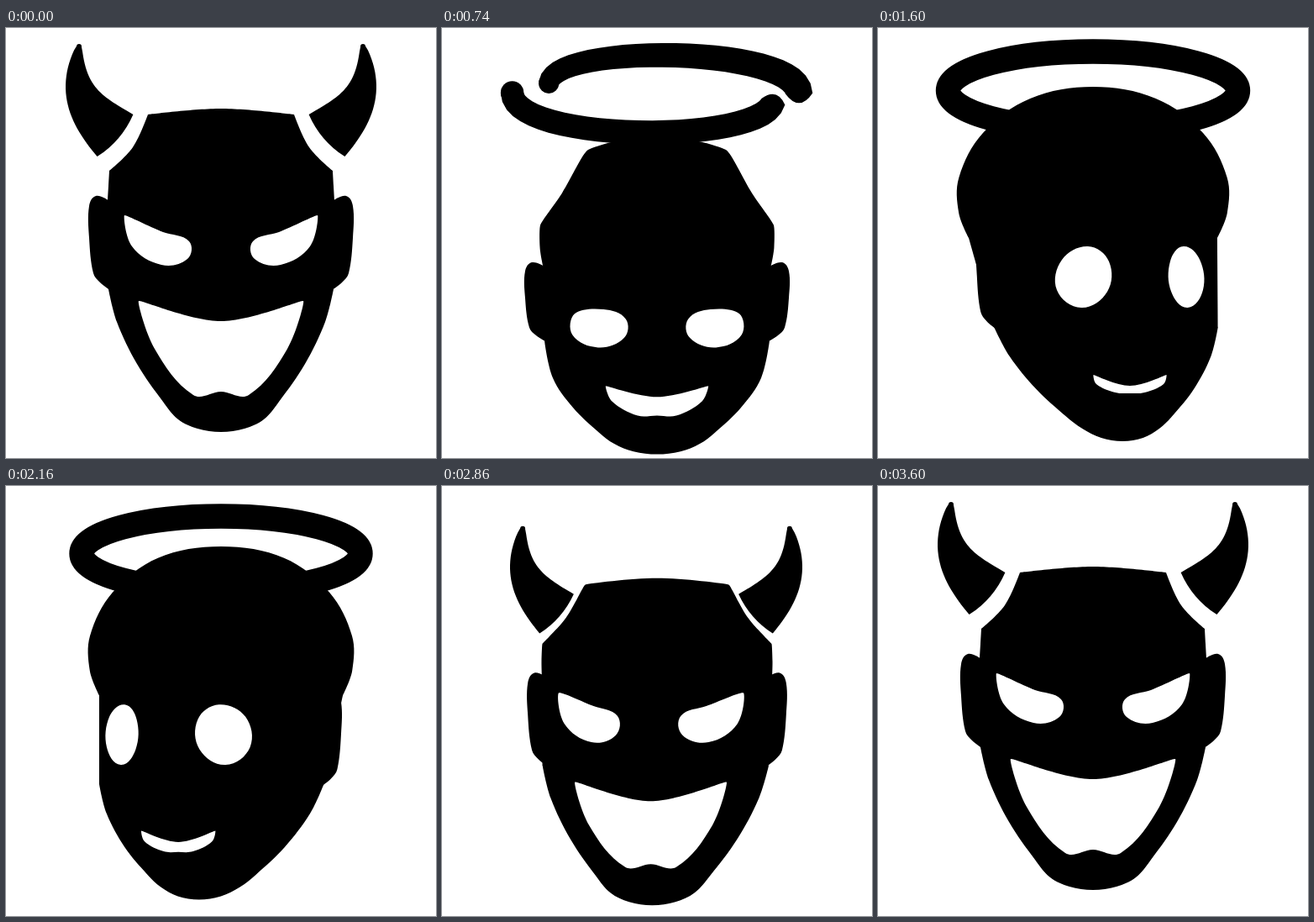
An HTML page with a canvas for the animation above (3.62 s loop, 512x512 px).

```html
<!DOCTYPE html>
<html lang="en">
<head>
<meta charset="utf-8">
<title>Devil and angel</title>
<style>
html, body { margin: 0; width: 100%; height: 100%; overflow: hidden; background: #fff; }
canvas { display: block; width: 100vw; height: 100vh; }
</style>
</head>
<body>
<canvas width="512" height="512"></canvas>
<script>
const ctx = document.querySelector('canvas').getContext('2d');
const LOOP = 3620, MID = 256, HALO_WIDTH = 29.4;

const pts = s => s.split(' ').map(p => p.split(',').map(Number));
const flip = shape => shape.map(([x, y]) => [2 * MID - x, y]);
const sym = half => [...half, ...flip(half.slice(1, -1).reverse())];
const clamp = v => Math.max(0, Math.min(1, v));

// Blends numbers, arrays and objects of the same structure.
function lerp(a, b, k) {
  if (typeof a === 'number') return a + (b - a) * k;
  if (Array.isArray(a)) return a.map((v, i) => lerp(v, b[i], k));
  return Object.fromEntries(Object.keys(a).map(key => [key, lerp(a[key], b[key], k)]));
}

const ease = {
  both: k => k * k * (3 - 2 * k),
  in: k => k ** 1.5,
  out: k => Math.sin(k * Math.PI / 2),
  flat: k => k
};

// Keys are [time, value, easing towards it].
function track(keys, t) {
  const i = keys.findIndex(k => t < k[0]);
  if (i < 1) return keys[0][1];
  const [t0, a] = keys[i - 1], [t1, b, kind = 'flat'] = keys[i];
  return lerp(a, b, ease[kind]((t - t0) / (t1 - t0)));
}

// Key shapes, devil first and angel second.
const skulls = [
  pts('256,96 343,103 361,142 389,170 390,188 391,205 390,311'),
  pts('256,70 330,84 382,125 404,178 404,220 393,250 390,356')];
const eyes = [
  pts('141,223 187,243 218,254 216,275 185,282 150,260'),
  pts('163,276 194,260 219,278 217,314 186,333 157,312')];
const mouths = [
  pts('256,349 158,325 177,382 223,437 256,433'),
  pts('256,426 206,413 210,424 236,434 256,435')];
const jaw = pts('380,350 356,400 325,445 307,466 284,477 256,481');
const ear = pts('389,206 405,200 413,212 413,250 408,292 400,303 388,312');

// skull and face run from devil (0) to angel (1); turn moves the features, chin the head.
const devil = { skull: 0, face: 0, squash: 0, turn: 0, chin: 0, drop: 0 };
const angel = { ...devil, skull: 1, face: 1 };
const right = { ...angel, turn: 1, chin: 1 };
const left = { ...angel, turn: -1.2, chin: -0.77 };
const low = { ...devil, skull: 0.12, face: 0.12, turn: -0.17, chin: -0.17, drop: 17 };
const headKeys = [
  [400, devil], [560, { ...devil, skull: 0.15, face: 0.68, squash: 1 }, 'both'],
  [1080, angel, 'both'], [1120, angel], [1560, right, 'both'], [1600, right],
  [1880, left, 'both'], [2080, left], [2720, { ...low, drop: 21 }, 'both'],
  [2860, low, 'both'], [3600, devil, 'out'], [LOOP, devil]];

// A horn is a tapered brush along a cubic curve; cap rounds its base.
const horn = { line: pts('87,22 77,73 96,99 130,128'), tip: 6, base: 66, cap: 10 };
const horns = [horn, { ...horn, line: flip(horn.line) }];
const lowHorns = horns.map(h => ({
  line: h.line.map(([x, y]) => [255 + (x - MID) * 0.94, 29.8 + y * 0.956]),
  tip: 6, base: 62, cap: 9
}));
const swoosh = [
  { line: pts('84,88 88,138 175,152 247,145'), tip: 19, base: 27, cap: 8 },
  { line: pts('316,28 352,38 403,61 410,92'), tip: 2, base: 46, cap: 36 }];
const halo = { cy: 74.5, rx: 172.5, ry: 46.5 };
const smallHalo = { cy: 80.5, rx: 166, ry: 44.5 };
const halves = ({ cy, rx, ry }) => [1, -1].map(dir => {
  const y = cy + dir * ry * 4 / 3;
  return {
    line: [[MID - rx, cy], [MID - rx, y], [MID + rx, y], [MID + rx, cy]],
    tip: HALO_WIDTH, base: HALO_WIDTH, cap: 20
  };
});
const RING_START = 860, SHRINK = 2080, RING_END = 2180;
const hornKeys = [
  [400, horns], [560, swoosh, 'in'], [RING_START, halves(halo), 'out'],
  [RING_END, halves(smallHalo)], [2420, swoosh], [2720, lowHorns, 'out'],
  [2860, lowHorns], [3600, horns, 'out'], [LOOP, horns]];

function brush({ line: [a, b, c, d], tip, base, cap }) {
  const inner = [], outer = [], steps = 28;
  let dir;
  for (let i = 0; i <= steps; i++) {
    const t = i / steps, s = 1 - t;
    const [x, y] = [0, 1].map(n =>
      s ** 3 * a[n] + 3 * s * s * t * b[n] + 3 * s * t * t * c[n] + t ** 3 * d[n]);
    dir = [0, 1].map(n =>
      s * s * (b[n] - a[n]) + 2 * s * t * (c[n] - b[n]) + t * t * (d[n] - c[n]));
    const len = Math.hypot(...dir), w = (tip + (base - tip) * t ** 0.8) / 2;
    dir = dir.map(v => v / len);
    inner.push([x + dir[1] * w, y - dir[0] * w]);
    outer.push([x - dir[1] * w, y + dir[0] * w]);
  }
  ctx.fillStyle = '#000';
  ctx.beginPath();
  inner.forEach(p => ctx.lineTo(...p));
  ctx.quadraticCurveTo(d[0] + dir[0] * cap, d[1] + dir[1] * cap, ...outer[steps]);
  outer.reverse().forEach(p => ctx.lineTo(...p));
  ctx.fill();
  ctx.beginPath();
  ctx.arc(...a, tip / 2, 0, 2 * Math.PI);
  ctx.fill();
}

// Closed smooth curve; soft(i) is the roundness at point i, 0 being a corner.
function blob(shape, color, soft) {
  const n = shape.length, at = i => shape[(i + n) % n];
  const handle = (i, len) => {
    const [ax, ay] = at(i - 1), [bx, by] = at(i + 1);
    const k = 0.35 * len * soft(i % n) / Math.hypot(bx - ax, by - ay);
    return [(bx - ax) * k, (by - ay) * k];
  };
  ctx.beginPath();
  ctx.moveTo(...shape[0]);
  for (let i = 0; i < n; i++) {
    const [x, y] = at(i), [u, v] = at(i + 1), len = Math.hypot(u - x, v - y);
    const [hx, hy] = handle(i, len), [gx, gy] = handle(i + 1, len);
    ctx.bezierCurveTo(x + hx, y + hy, u - gx, v - gy, u, v);
  }
  ctx.fillStyle = color;
  ctx.fill();
}

function drawTop(t) {
  if (t < RING_START || t > RING_END) return track(hornKeys, t).forEach(brush);
  const { cy, rx, ry } = lerp(halo, smallHalo, ease.in(clamp((t - SHRINK) / 80)));
  ctx.beginPath();
  ctx.ellipse(MID, cy, rx, ry, 0, 0, 2 * Math.PI);
  ctx.lineWidth = HALO_WIDTH;
  ctx.stroke();
}

const nod = (t, a, b) => Math.sin(Math.PI * clamp((t - a) / (b - a))) ** 2;

function drawHead(t) {
  const { skull, face, squash, turn, chin, drop } = track(headKeys, t);
  const dip = 14 * nod(t, 1120, 1560) + 16 * nod(t, 1600, 1880);
  const settle = ([x, y]) => [x, y + drop + dip * (y - 70) / 422];
  const sag = ([x, y]) =>
    [x, y + squash * (Math.min(85, y - 27) - 60 * clamp((y - 220) / 270))];
  const longJaw = ([x, y]) => [x, y + face * (45 - 34 * clamp((y - 311) / 155) ** 1.5)];
  const rotate = ([x, y]) => {
    const depth = Math.max(0, (y - 250) / 240);
    const widen = 0.08 * Math.abs(chin) * (Math.min(1, (y - 70) / 110) - 2.4 * depth);
    return [x + (x - MID) * widen + 35 * chin * depth, y];
  };

  const half = [...lerp(...skulls, skull), ...jaw.map(longJaw)];
  blob(sym(half.map(sag)).map(rotate).map(settle), '#000', i => {
    const j = Math.min(i, 24 - i);
    return j === 5 || j === 6 ? 0 : j === 1 || j === 3 ? skull : 1;
  });

  const earIn = 1 - 0.12 * Math.abs(chin);
  const side = ear.map(([x, y]) => sag([MID + (x - MID) * earIn, y + 46 * skull])).map(settle);
  for (const e of [side, flip(side)]) blob(e, '#000', i => i % 6 ? 1 : 0);

  // The eye on the far side narrows towards its inner edge.
  const eye = lerp(...eyes, face).map(([x, y]) => [x, y + squash * (217 - 0.42 * y)]);
  for (const dir of [-1, 1]) {
    const inner = MID + dir * 34, narrow = 1 - 0.37 * Math.max(0, dir * turn);
    const shape = (dir < 0 ? eye : flip(eye))
      .map(([x, y]) => [inner + (x - inner) * narrow + 56 * turn, y]);
    blob(shape.map(settle), '#fff', i => i ? 1 : 0.1 + 0.9 * face);
  }

  const mouth = sym(lerp(...mouths, face)).map(sag).map(([x, y]) =>
    [MID + (x - MID) * (1 - 0.13 * Math.abs(turn)) + 44 * turn, y]);
  blob(mouth.map(settle), '#fff', i => i === 1 || i === 7 ? 0.1 : 1);
}

function frame(now) {
  const t = now % LOOP;
  ctx.fillStyle = '#fff';
  ctx.fillRect(0, 0, 512, 512);
  drawTop(t);
  drawHead(t);
  requestAnimationFrame(frame);
}
frame(0);
</script>
</body>
</html>
```
